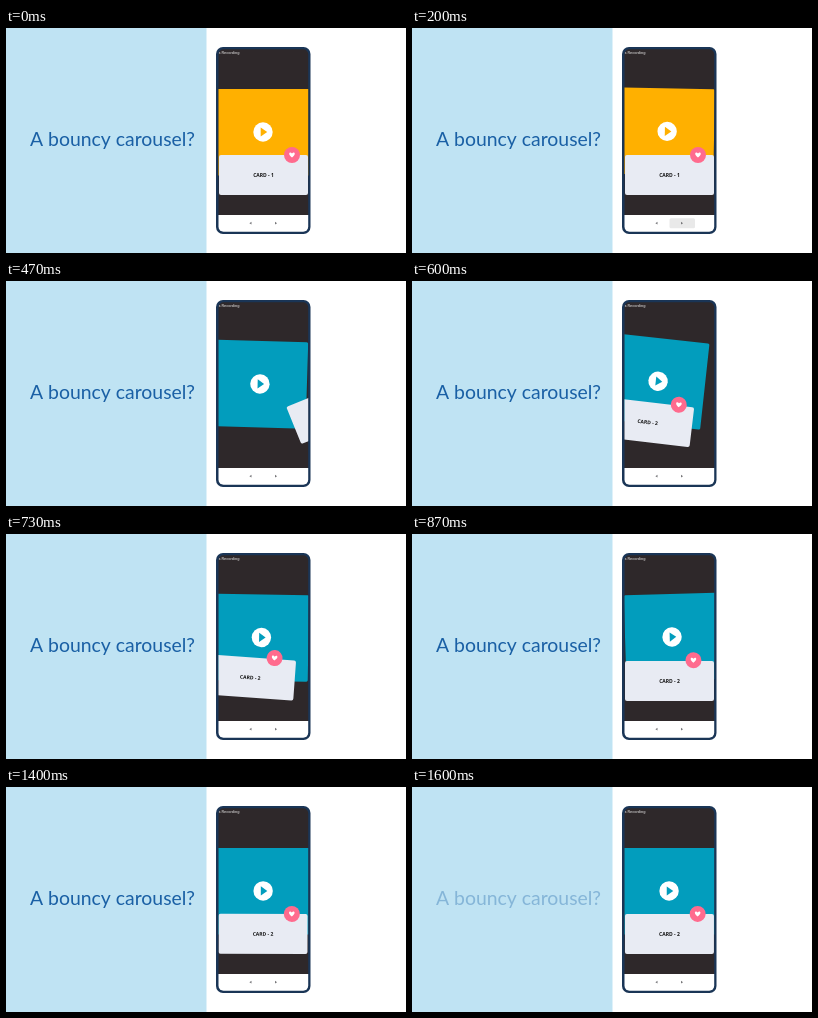
Animation of 400 by 225 pixels, one loop 1.67 s. Source, as an HTML page with a canvas:

```html
<!DOCTYPE html>
<html lang="en">
<head>
<meta charset="utf-8">
<title>A bouncy carousel</title>
<style>
html, body { margin: 0; width: 100%; height: 100%; overflow: hidden; background: #fff; }
canvas { display: block; width: 400px; height: 225px; }
</style>
</head>
<body>
<canvas id="stage"></canvas>
<script>
const LOOP = 1670, FRAMES = 25;
const canvas = document.getElementById('stage');
const ctx = canvas.getContext('2d');
const ratio = window.devicePixelRatio || 1;
canvas.width = 400 * ratio;
canvas.height = 225 * ratio;

const YELLOW = '#ffb000', TEAL = '#029dbd', NAVY = '#1a3556';

// Resting centre, distance between cards, turn (degrees) and lift per pixel
// of travel, slide times (ms), then the bounce: size, half period, damping.
const picture = { x: 257, y: 104, gap: 185, turn: 0.57, lift: 0.34,
                  start: 130, arrive: 455, size: 21, swing: 300, damping: 0.0045 };
const panel = { x: 257.5, y: 147, gap: 252, turn: 0.31, lift: 0.27,
                start: 300, arrive: 490, size: 48, swing: 380, damping: 0.005 };
const heart = { x: 286, y: 127, gap: 252, turn: 0.3, lift: 0.17,
                start: 310, arrive: 510, size: 47, swing: 430, damping: 0.0045 };

const clamp = v => Math.max(0, Math.min(1, v));

// Offset of the second card: a cubic slide in, then a damped swing.
function offsetAt(part, t) {
  const late = t - part.arrive;
  if (late < 0) {
    const p = clamp((t - part.start) / (part.arrive - part.start));
    return part.gap * (1 - p ** 3);
  }
  return -part.size * Math.exp(-part.damping * late) * Math.sin(Math.PI * late / part.swing);
}

const frameTime = k => Math.round(k * 20 / 3) * 10;

// Hold the pose between frames of the 15 fps clip.
function heldTime(t) {
  let k = FRAMES - 1;
  while (frameTime(k) > t) k--;
  return frameTime(k);
}

function box(x, y, w, h, r, color) {
  ctx.beginPath();
  ctx.roundRect(x, y, w, h, r);
  ctx.fillStyle = color;
  ctx.fill();
}

function disc(r, color) {
  ctx.beginPath();
  ctx.arc(0, 0, r, 0, Math.PI * 2);
  ctx.fillStyle = color;
  ctx.fill();
}

function triangle(left, tip, y, half, color) {
  ctx.beginPath();
  ctx.moveTo(left, y - half);
  ctx.lineTo(tip, y);
  ctx.lineTo(left, y + half);
  ctx.fillStyle = color;
  ctx.fill();
}

function label(text, x, y, font, color, align = 'left') {
  ctx.font = font;
  ctx.fillStyle = color;
  ctx.textAlign = align;
  ctx.fillText(text, x, y);
}

function drawPicture(color) {
  box(-47, -43, 94, 86.5, 1.5, color);
  disc(9.7, '#fff');
  triangle(-2.3, 4.2, 0, 4.6, color);
}

function drawPanel(number) {
  box(-44.5, -20, 89, 40, 2, '#e8ebf3');
  label('CARD - ' + number, 0, 1.9, 'bold 5px "Open Sans", "Noto Sans", sans-serif', '#111', 'center');
}

function drawHeart() {
  disc(8, '#ff6b8e');
  ctx.beginPath();
  ctx.moveTo(0, 2.5);
  ctx.bezierCurveTo(-5.2, -1.4, -1.8, -4, 0, -1.4);
  ctx.bezierCurveTo(1.8, -4, 5.2, -1.4, 0, 2.5);
  ctx.fillStyle = '#fff';
  ctx.fill();
}

function place(part, dx, draw) {
  if (Math.abs(dx) > 170) return;
  ctx.save();
  ctx.translate(part.x + dx, part.y - Math.abs(dx) * part.lift);
  ctx.rotate(-dx * part.turn * Math.PI / 180);
  draw();
  ctx.restore();
}

function drawCard(number, color, t) {
  const offset = part => offsetAt(part, t) - (number === 1 ? part.gap : 0);
  place(picture, offset(picture), () => drawPicture(color));
  place(panel, offset(panel), () => drawPanel(number));
  place(heart, offset(heart), drawHeart);
}

function drawPhone(t) {
  box(210, 19, 94.5, 187, 7, NAVY);
  ctx.save();
  ctx.beginPath();
  ctx.roundRect(212.5, 21.3, 89.7, 182.4, 5);
  ctx.clip();
  ctx.fillStyle = '#2e282a';
  ctx.fillRect(212, 21, 91, 166);
  drawCard(1, YELLOW, t);
  drawCard(2, TEAL, t);
  label('s Recording', 212.5, 26.4, '4px Roboto, sans-serif', '#eee');

  ctx.fillStyle = '#fff';
  ctx.fillRect(212, 187, 91, 18);
  ctx.globalAlpha = clamp(Math.min((t - 130) / 70, (470 - t) / 140));
  box(257.5, 190.3, 25.5, 10, 1.5, '#e9e9e9');
  ctx.globalAlpha = 1;
  triangle(245.5, 243.4, 195.2, 1.4, '#77777a');
  triangle(269, 271.1, 195.2, 1.4, '#77777a');
  ctx.restore();
}

function draw(t) {
  ctx.setTransform(ratio, 0, 0, ratio, 0, 0);
  ctx.fillStyle = '#fff';
  ctx.fillRect(0, 0, 400, 225);
  ctx.fillStyle = '#bfe3f3';
  ctx.fillRect(0, 0, 200.5, 225);
  ctx.globalAlpha = clamp((LOOP - t) / 200);
  label('A bouncy carousel?', 24, 118, '19.4px Lato, sans-serif', '#1a60a5');
  ctx.globalAlpha = 1;
  drawPhone(t);
}

const start = performance.now();
function tick() {
  draw(heldTime((performance.now() - start) % LOOP));
  requestAnimationFrame(tick);
}
tick();
</script>
</body>
</html>
```
